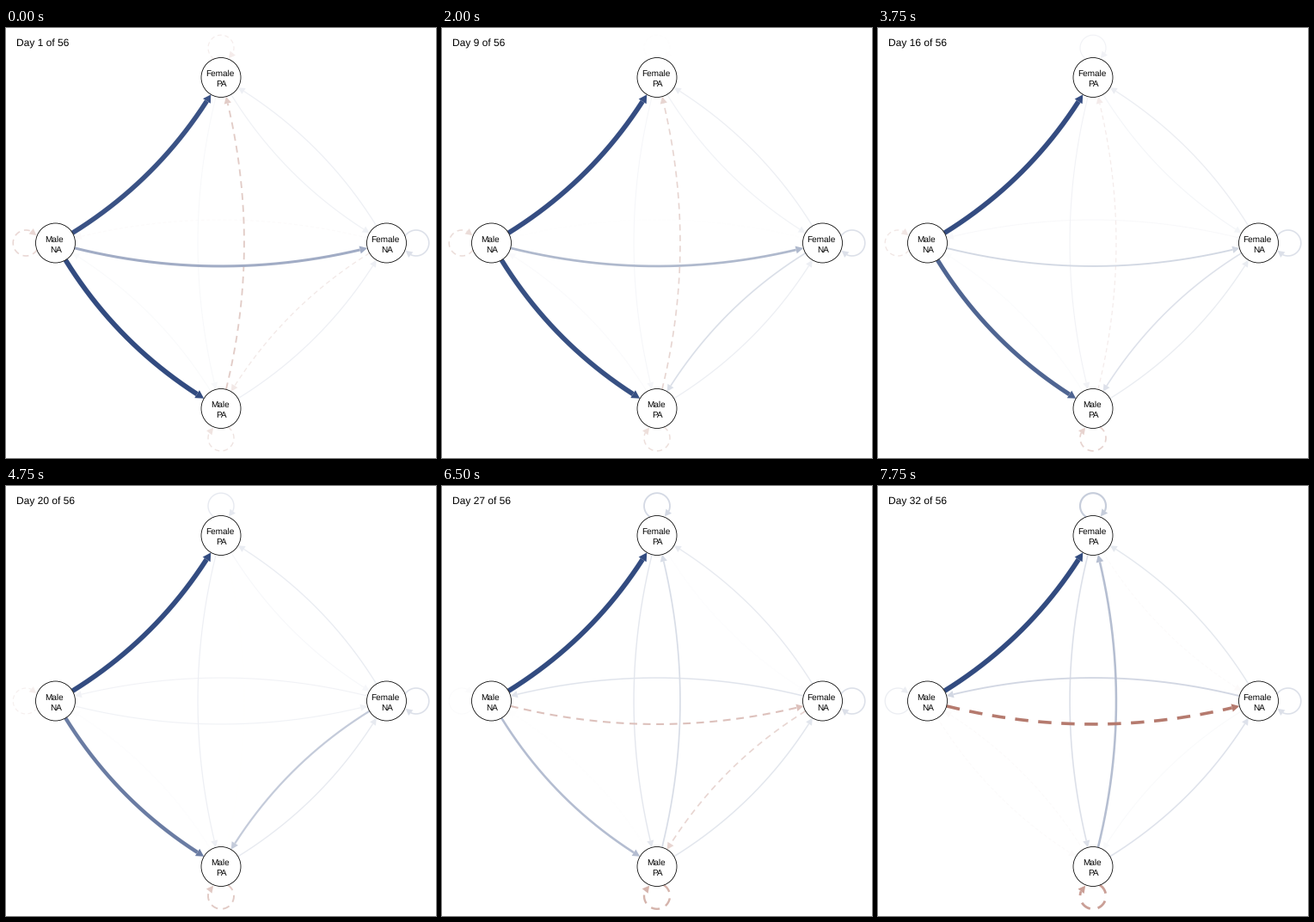
Recreate the animation shown at these times as a matplotlib script. Size 500 by 500 pixels, loop 8 s.

```python
import numpy as np
import matplotlib.pyplot as plt
from matplotlib.animation import FuncAnimation
from matplotlib.patches import Circle, Polygon

plt.rcParams["text.hinting"] = "none"

SIZE, DPI = 500, 100
PX = 72 / DPI                      # points per pixel
FRAMES, INTERVAL = 32, 250
RADIUS, LOOP_RADIUS, LOOP_DIST = 23, 15, 34.3
BEND = 0.14                        # control point offset / edge length
BLUE = np.array([50, 75, 128]) / 255
RED = np.array([125, 22, 0]) / 255
DASH = (0, (4.3, 3.2))
FONT = "Liberation Sans"

# Nodes sit on a circle around the middle, a quarter turn apart.
LABELS = {"FN": "Female", "MP": "Male", "MN": "Male", "FP": "Female"}
CENTERS = {
    name: SIZE / 2 + 192.5 * np.array([np.cos(k * np.pi / 2), np.sin(k * np.pi / 2)])
    for k, name in enumerate(LABELS)
}


def drift(start, end, power=2):
    """Strength that moves slowly at first, then faster."""
    return lambda day: start + (end - start) * ((day - 1) / (FRAMES - 1)) ** power


def through(*points):
    """Strength that wanders through (day, value) points."""
    days, values = zip(*points)
    return lambda day: np.interp(day, days, values)


# Signed edge strengths; negative ones are red and dashed.
STRENGTHS = {
    "MN FP": drift(.96, 1, .3),
    "MN MP": drift(1, -.02, 2.7),
    "MN FN": drift(.46, -.57),
    "MP FP": drift(-.22, .36),
    "FP MP": drift(.04, .17),
    "FN MN": drift(-.02, .22),
    "FN MP": through((1, -.10), (5, .20), (9, .18), (13, .07),
                     (20, .29), (27, -.18), (32, .03)),
    "MP FN": drift(.09, .16),
    "FN FP": drift(.09, .13),
    "FP FN": drift(.08, -.02),
    "MP MN": drift(.03, -.02),
    "FP FP": drift(-.08, .28, 1.2),
    "MN MN": drift(-.17, .10),
    "FN FN": drift(.17, .17),
    "MP MP": drift(-.12, -.41),
}


def edge_path(a, b):
    """Curve between two nodes, bowed to the right of travel, cut at the rims."""
    p, q = CENTERS[a], CENTERS[b]
    d = q - p
    ctrl = (p + q) / 2 + BEND * np.array([-d[1], d[0]])
    t = np.linspace(0, 1, 500)[:, None]
    pts = (1 - t) ** 2 * p + 2 * t * (1 - t) * ctrl + t ** 2 * q
    outside = [np.hypot(*(pts - c).T) >= RADIUS for c in (p, q)]
    return pts[outside[0] & outside[1]]


def loop_path(name):
    """Clockwise loop on the side facing away from the middle."""
    p = CENTERS[name]
    out = (p - SIZE / 2) / np.hypot(*(p - SIZE / 2))
    side = np.array([-out[1], out[0]])
    a = np.radians(np.linspace(-148, 144, 300))[:, None]
    return p + LOOP_DIST * out + LOOP_RADIUS * (np.cos(a) * out + np.sin(a) * side)


class Edge:
    def __init__(self, ax, key, strength):
        a, b = key.split()
        self.path = loop_path(a) if a == b else edge_path(a, b)
        self.strength = strength
        self.line, = ax.plot([], [], solid_capstyle="butt", dash_capstyle="butt")
        self.head = ax.add_patch(Polygon(np.zeros((3, 2)), lw=0))

    def update(self, day):
        w = self.strength(day)
        s = abs(w)
        color = 1 - s * (1 - (BLUE if w > 0 else RED))

        tip = self.path[-1]
        length, half = 7.5 + 1.5 * s, 3.9 + 1.4 * s
        far = np.hypot(*(self.path - tip).T) >= length
        stop = np.nonzero(far)[0][-1] + 1
        base = self.path[stop - 1]
        u = (tip - base) / np.hypot(*(tip - base))
        n = half * np.array([-u[1], u[0]])

        self.line.set_data(*self.path[:stop].T)
        self.line.set_linewidth((0.75 + 5 * s) * PX)
        self.line.set_linestyle("-" if w > 0 else DASH)
        self.line.set_color(color)
        self.head.set_xy([tip, base + n, base - n])
        self.head.set_facecolor(color)
        for part in (self.line, self.head):
            part.set_zorder(1 + s)


fig = plt.figure(figsize=(SIZE / DPI, SIZE / DPI), dpi=DPI, facecolor="white")
ax = fig.add_axes([0, 0, 1, 1])
ax.set_xlim(0, SIZE)
ax.set_ylim(SIZE, 0)
ax.set_autoscale_on(False)
ax.axis("off")


def label(x, y, text, size, align):
    return ax.text(x, y, text, family=FONT, size=size * PX, ha=align,
                   va="baseline", color="black", zorder=6)


edges = [Edge(ax, key, strength) for key, strength in STRENGTHS.items()]

for name, (x, y) in CENTERS.items():
    ax.add_patch(Circle((x, y), RADIUS, fc="white", ec="black", lw=0.8 * PX, zorder=5))
    label(x - 1.3, y - 1.2, LABELS[name], 10, "center")
    label(x + 0.2, y + 10.6, name[1] + "A", 10, "center")

title = label(12, 22, "", 12, "left")


def update(i):
    day = i + 1
    title.set_text(f"Day {day} of 56")
    for edge in edges:
        edge.update(day)
    return []


anim = FuncAnimation(fig, update, frames=FRAMES, interval=INTERVAL,
                     repeat=True, repeat_delay=0, blit=False)
plt.show()
```
